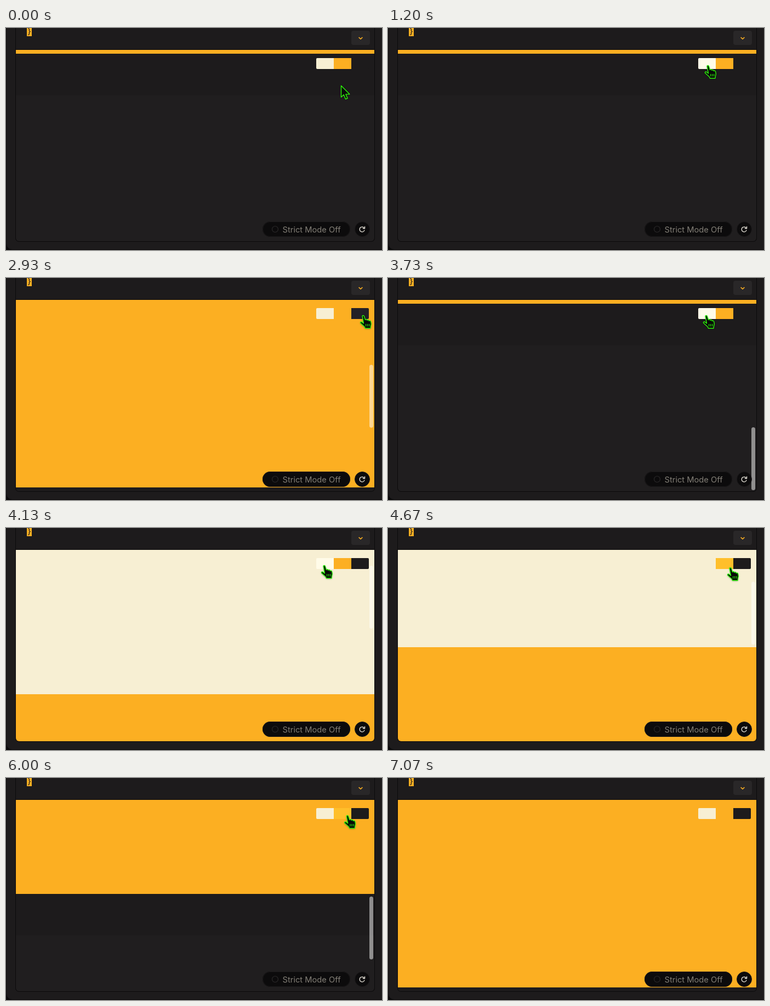
Recreate the animation shown at these times as an HTML page with a canvas. Size 686 by 406 pixels, loop 7.14 s.

```html
<!DOCTYPE html>
<html lang="en">
<head>
<meta charset="utf-8">
<title>Scroll switcher</title>
<style>
html, body { margin: 0; width: 100%; height: 100%; overflow: hidden; background: #1d1b1c; }
canvas { display: block; width: 686px; height: 406px; }
</style>
</head>
<body>
<canvas id="stage" width="686" height="406"></canvas>
<script>
const ctx = document.getElementById('stage').getContext('2d');
const LOOP = 7140;
const CREAM = '#f7efd3', AMBER = '#fcaf22', DARK = '#1d1b1c', PANEL = '#201e1f', EDGE = '#0b0a0b';
const VIEW = { x: 18, y: 40, w: 654, h: 350 };
const SECTION = 343, MAX = 679;

// [start, from, to]
const scrolls = [
  [1204, MAX, 0], [2370, 0, SECTION], [2990, SECTION, MAX], [3800, MAX, 0],
  [4520, 0, SECTION], [5200, SECTION, MAX], [5850, MAX, SECTION]
];

// [time, x, y] of the pointer tip
const path = [
  [0, 611, 105], [400, 611, 105], [1050, 583, 68], [1200, 583, 68], [1530, 591, 118],
  [1800, 593, 119], [2250, 614, 69], [2400, 614, 69], [2730, 651, 68], [3260, 651, 68],
  [3610, 580, 68], [4230, 580, 68], [4500, 623, 71], [4670, 624, 72], [4800, 624, 72],
  [5060, 648, 68], [5200, 648, 68], [5400, 626, 68], [6130, 622, 68], [6400, 602, -32]
];

const buttons = [
  { x: 566, color: CREAM, hover: '#fffbe8', radii: [2, 0, 0, 2] },
  { x: 598, color: AMBER, hover: '#ffbf2a', radii: 0 },
  { x: 630, color: DARK, hover: '#232026', radii: [0, 2, 2, 0] }
];

const clamp = v => Math.max(0, Math.min(1, v));
const mix = (a, b, k) => a + (b - a) * k;

// cubic-bezier(.42, 0, .58, 1)
function easeInOut(p) {
  let lo = 0, hi = 1, u = p;
  for (let i = 0; i < 20; i++) {
    u = (lo + hi) / 2;
    const x = 1.26 * u * (1 - u) * (1 - u) + 1.74 * u * u * (1 - u) + u * u * u;
    if (x < p) lo = u; else hi = u;
  }
  return u * u * (3 - 2 * u);
}

function scrollAt(t) {
  let pos = MAX, alpha = 0;
  for (const [start, from, to] of scrolls) {
    if (t < start) break;
    const length = Math.sqrt(Math.abs(to - from)) / 60 * 1000;
    pos = mix(from, to, easeInOut(clamp((t - start) / length)));
    alpha = clamp(1 - (t - start - length - 500) / 170);
  }
  return { pos: Math.round(pos), alpha };
}

function pointerAt(t) {
  const i = path.findIndex(p => p[0] > t);
  if (i < 0) return null;
  const a = path[i - 1], b = path[i];
  const k = easeInOut((t - a[0]) / (b[0] - a[0]));
  return { x: mix(a[1], b[1], k), y: mix(a[2], b[2], k) };
}

function rect(x, y, w, h, color) {
  ctx.fillStyle = color;
  ctx.fillRect(x, y, w, h);
}

function round(x, y, w, h, r, color) {
  ctx.beginPath();
  ctx.roundRect(x, y, w, h, r);
  ctx.fillStyle = color;
  ctx.fill();
}

function line(color, width) {
  ctx.strokeStyle = color;
  ctx.lineWidth = width;
  ctx.stroke();
}

function drawFrame() {
  rect(0, 0, 686, 406, EDGE);
  round(1, -20, 705, 425, 10, DARK);
  round(17, -20, 656, 411, 7, EDGE);
  rect(18, 0, 654, 39, DARK);

  rect(38, 0, 9, 15, AMBER);
  ctx.fillStyle = DARK;
  ctx.font = '15px "Noto Sans Mono", monospace';
  ctx.fillText('}', 38, 10);

  round(630, 5, 34, 26, 4, '#292728');
  ctx.beginPath();
  ctx.moveTo(643.6, 17);
  ctx.lineTo(647, 20.2);
  ctx.lineTo(650.4, 17);
  line(AMBER, 1.7);
}

function drawView(pos, alpha) {
  const { x, y, w, h } = VIEW;
  ctx.save();
  ctx.beginPath();
  ctx.roundRect(x, y, w, h, [0, 0, 6, 6]);
  ctx.clip();
  const top = y - pos;
  rect(x, top, w, SECTION, CREAM);
  rect(x, top + SECTION, w, SECTION, AMBER);
  rect(x, top + 2 * SECTION, w, SECTION, PANEL);
  rect(x, top + 2 * SECTION, w, 76, DARK);
  ctx.restore();

  if (alpha > 0) {
    ctx.globalAlpha = alpha;
    round(663, 42 + pos * 231 / MAX, 7, 115, 3.5, 'rgba(255,255,255,.5)');
    ctx.globalAlpha = 1;
  }
}

function drawControls(over) {
  for (const b of buttons) {
    round(b.x, 55, 32, 20, b.radii, b === over ? b.hover : b.color);
  }

  round(468, 354, 160, 28, 14, '#0c0b0c');
  ctx.beginPath();
  ctx.roundRect(468.5, 354.5, 159, 27, 13.5);
  line('#1a1819', 1);
  ctx.beginPath();
  ctx.arc(491, 368, 5.5, 0, 7);
  line('#2b292a', 1.2);
  ctx.fillStyle = '#827e76';
  ctx.font = '14.7px Inter, "Open Sans", sans-serif';
  ctx.fillText('Strict Mode Off', 504.5, 374);

  ctx.beginPath();
  ctx.arc(650, 368, 13.5, 0, 7);
  ctx.fillStyle = '#0c0b0c';
  ctx.fill();
  line('#1a1819', 1);
  ctx.beginPath();
  ctx.arc(649.7, 368.3, 4.5, 0.25, -0.65, false);
  line('#f2eee4', 1.3);
  ctx.beginPath();
  ctx.moveTo(654.5, 362.8);
  ctx.lineTo(654.5, 366.5);
  ctx.lineTo(650.8, 366.5);
  line('#f2eee4', 1.3);
}

const arrow = new Path2D('M0 0V21L4.7 16.6L8 24.5L11.6 23L8.4 15.6H15.4Z');
const hand = new Path2D('M-1.5 1.5C-1.5-.5 1.5-.5 2 1.5L4 8C5 6.5 7 7 7.3 8.8C8.5 7.5 10.3 8 10.8 10' +
  'C12 9 13.8 9.5 14.2 11.5C15.2 14.5 15 17 14 19.5L13.5 23.5H4L2.5 20.5L-5 13.8' +
  'C-5.5 11.5-3.5 11-2 12.2L1 14.5Z');
const fingers = new Path2D('M5.2 15.5V20M8.2 15.5V20M11.2 15.5V20');

function drawPointer(p, isHand) {
  ctx.save();
  ctx.translate(p.x + 0.5, p.y + 0.5);
  ctx.shadowColor = 'rgba(0,0,0,.4)';
  ctx.shadowBlur = 3;
  ctx.shadowOffsetY = 1;
  ctx.fillStyle = '#080908';
  const shape = isHand ? hand : arrow;
  ctx.fill(shape);
  ctx.shadowColor = 'transparent';
  ctx.strokeStyle = '#2df50a';
  ctx.lineWidth = 1.4;
  ctx.lineJoin = 'round';
  ctx.stroke(shape);
  if (isHand) {
    ctx.lineWidth = 1.1;
    ctx.stroke(fingers);
  }
  ctx.restore();
}

function draw(t) {
  const { pos, alpha } = scrollAt(t);
  const p = pointerAt(t);
  const over = p && buttons.find(b => p.x >= b.x && p.x < b.x + 32 && p.y >= 55 && p.y < 75);
  drawFrame();
  drawView(pos, alpha);
  drawControls(over);
  if (p) drawPointer(p, Boolean(over));
}

const began = performance.now();
function tick() {
  draw((performance.now() - began) % LOOP);
  requestAnimationFrame(tick);
}
tick();
</script>
</body>
</html>
```
